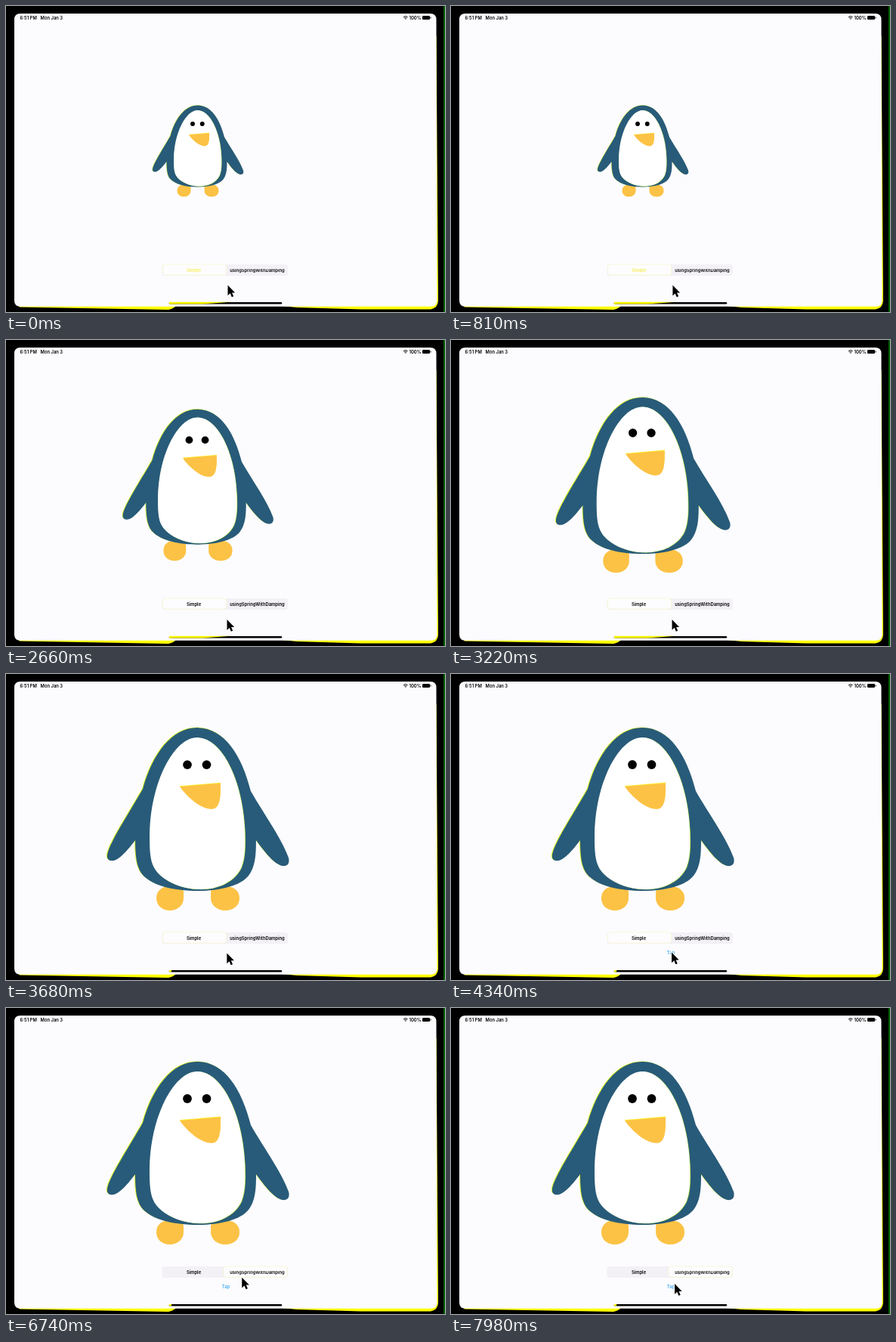
Write an HTML page that moves like this. It is 581 by 405 pixels and loops after 8000 ms.

```html
<!DOCTYPE html>
<html lang="en">
<head>
<meta charset="utf-8">
<title>Penguin</title>
<style>
  html, body { margin: 0; width: 100%; height: 100%; overflow: hidden; background: #000; }
  svg { display: block; width: 581px; height: 405px; }
  text { font: 600 5.85px Inter, "Liberation Sans", sans-serif; }
  .mid { text-anchor: middle; }
</style>
</head>
<body>
<svg viewBox="0 0 581 405">
  <defs>
    <path id="body" d="M253 71C220 71 194 105 181 152C164 182 142 215 135 235C132 244 135 248 142 247C150 246 162 232 171 220C171 242 173 256 180 265C194 281 223 287 254 287C284 287 311 280 321 267C330 255 331 240 331 220C342 235 355 252 366 254C373 255 376 250 374 243C364 216 343 188 324 155C312 107 289 71 253 71Z"/>
    <path id="belly" d="M253 84C222 84 190 145 190 215C190 238 191 251 199 261C211 276 235 285 257 285C281 285 302 275 311 257C316 245 317 231 316 207C313 139 285 84 253 84Z"/>
    <path id="beak" d="M230 149L284 144.500C284 160 284 174 276 178C263 183 241 165 230 149Z"/>
    <path id="foot" d="M207 283C218 278 235 283 235 288V297C235 306 227 313 217 313C206 313 199 306 199 297C199 290 202 286 207 283Z"/>
    <clipPath id="lowerText"><rect x="290" y="348.300" width="84" height="10"/></clipPath>
  </defs>

  <rect width="581" height="405"/>
  <path d="M580 0V405" stroke="#007800" stroke-width="1.600"/>
  <path d="M16 396L18 398.500L215 402Q221 401 225 397ZM365 397L385 399L470 401.500H562Q571.500 400 572 390L569.500 40H560V397Z" fill="#ff0"/>
  <path d="M19 10H561.500Q569.500 10 569.500 18L570.500 390Q570.500 397.700 562.500 397.700H19Q11 397.700 11 389.700V18Q11 10 19 10Z" fill="#fcfcff"/>

  <text x="18.500" y="17.700">6:51 PM</text>
  <text x="45.500" y="17.700">Mon Jan 3</text>
  <text x="533.500" y="17.700">100%</text>
  <g fill="none" stroke="#000">
    <path d="M526 14.800Q528.800 12.300 531.600 14.800M527.300 16.200Q528.800 15 530.300 16.200"/>
    <path d="M528.300 17.300H529.300"/>
  </g>
  <rect x="551" y="13" width="10" height="5" rx="1.300"/>
  <rect x="561.500" y="14.500" width="1" height="2"/>

  <g id="penguin">
    <g fill="#fcc245">
      <use href="#foot"/>
      <use href="#foot" transform="translate(519 0) scale(-1.055 1)"/>
    </g>
    <use href="#body" x="-1" y="-.6" fill="#dcf52c"/>
    <use href="#body" fill="#285b79"/>
    <use href="#belly" x=".7" y=".3" fill="#b5e63b"/>
    <use href="#belly" fill="#fff"/>
    <circle cx="240" cy="120" r="5.900"/>
    <circle cx="265.500" cy="120" r="5.900"/>
    <use href="#beak" y="-.9" fill="#fff02a"/>
    <use href="#beak" fill="#fcc245"/>
  </g>

  <rect x="206.500" y="342" width="166.500" height="15" rx="3" fill="#f3f0f6"/>
  <rect id="thumb" x="207.500" y="342" width="84" height="14" rx="3" fill="#fdfdff" stroke="#f8f6c8" stroke-width=".7"/>
  <text id="simple" class="mid" x="248.500" y="351.500">Simple</text>
  <g id="springClip"><text class="mid" x="332.500" y="351.500">usingSpringWithDamping</text></g>
  <text id="tap" class="mid" x="291" y="370.500" fill="#43aaec">Tap</text>

  <path d="M217 393.300H364" stroke="#000" stroke-width="2.400" stroke-linecap="round"/>
  <path d="M216 392H219V394.500H216Z" fill="#ff0"/>
  <path id="barTint" d="M216 391.800H297L260 394.600H216Z" fill="#f7f300"/>

  <path id="cursor" d="M.5 1.500V15.300L3.700 12.300L5.800 17.200L8.200 16.200L6.100 11.400H10.200Z" stroke="#fff" stroke-width="1.600" paint-order="stroke"/>
</svg>
<script>
const LOOP = 8000;
const CENTER = [254, 192];
const cursorStops = [
  [0, 293, 368], [700, 293, 368], [1200, 292, 369], [3300, 292, 368.5],
  [4200, 291.5, 367], [4450, 291.5, 367], [5300, 330.5, 345.5],
  [6350, 330.5, 345.5], [7100, 295.5, 363.5], [LOOP, 295.5, 363.5]
];

const el = id => document.getElementById(id);
const mix = (a, b, p) => a + (b - a) * p;
const progress = (t, start, end) => Math.min(1, Math.max(0, (t - start) / (end - start)));

// cubic-bezier(.42, 0, .58, 1), solved by bisection
function easeInOut(x) {
  let low = 0, high = 1;
  for (let i = 0; i < 24; i++) {
    const s = (low + high) / 2;
    const bx = 1.26 * s * (1 - s) ** 2 + 1.74 * s * s * (1 - s) + s ** 3;
    if (bx < x) low = s; else high = s;
  }
  return low * low * (3 - 2 * low);
}

function cursorAt(t) {
  const next = Math.max(1, cursorStops.findIndex(stop => stop[0] > t));
  const [t0, x0, y0] = cursorStops[next - 1];
  const [t1, x1, y1] = cursorStops[next];
  const p = easeInOut(progress(t, t0, t1));
  return [mix(x0, x1, p), mix(y0, y1, p)];
}

function draw(t) {
  const scale = mix(0.5, 1, easeInOut(progress(t, 1050, 3770)));
  const [cx, cy] = CENTER;
  el("penguin").setAttribute("transform", `translate(${cx} ${cy}) scale(${scale}) translate(${-cx} ${-cy})`);

  const slide = easeInOut(progress(t, 5600, 6200));
  el("thumb").setAttribute("x", mix(207.5, 288, slide));
  el("simple").setAttribute("fill", t < 2000 ? "#f5ee55" : "#000");
  const clipped = t < 2000 || t > 6200;
  el("springClip").setAttribute("clip-path", clipped ? "url(#lowerText)" : "none");

  el("tap").setAttribute("opacity", progress(t, 3800, 4200));
  el("barTint").setAttribute("opacity", t < 3300 ? 1 : 0);
  el("cursor").setAttribute("transform", `translate(${cursorAt(t)})`);
}

const start = performance.now();
function tick() {
  draw((performance.now() - start) % LOOP);
  requestAnimationFrame(tick);
}
tick();
</script>
</body>
</html>
```
